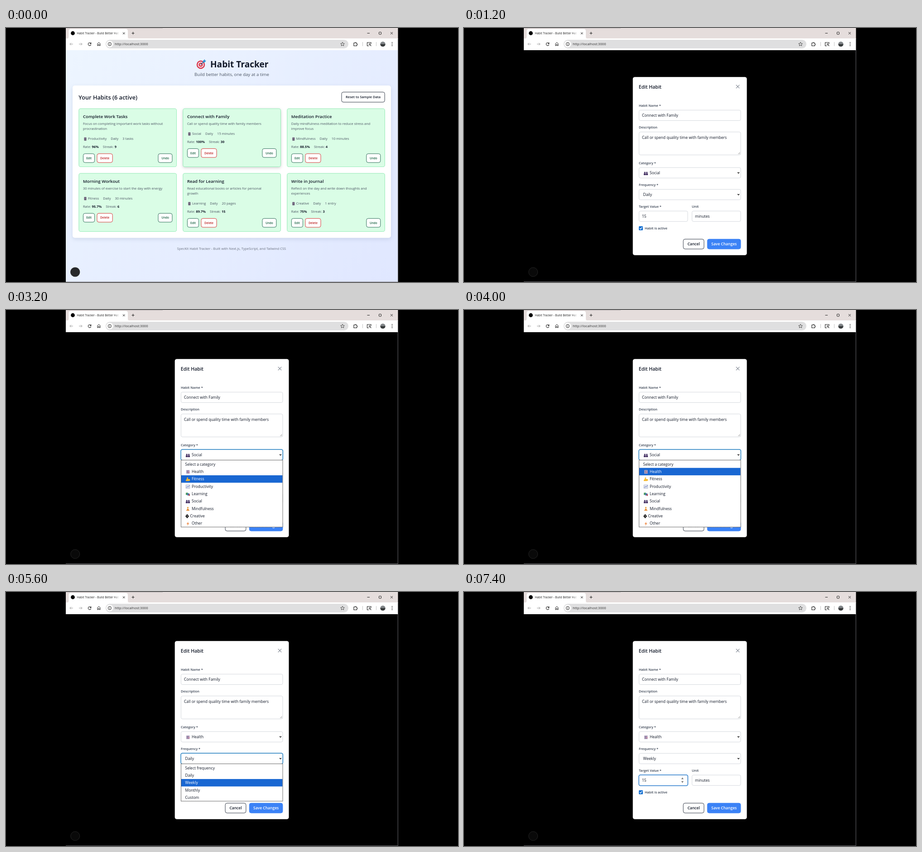
Write an HTML page that moves like this. It is 998 px wide and 561 px high and loops after 8000 ms.

```html
<!DOCTYPE html>
<html lang="en">
<head>
<meta charset="utf-8">
<title>Habit Tracker</title>
<style>
html, body { margin: 0; width: 100%; height: 100%; overflow: hidden; background: #000; }
svg { display: block; width: 998px; height: 561px; }
text { font-family: "Open Sans", "Noto Sans", sans-serif; white-space: pre; }
.panel { filter: drop-shadow(0 3px 4px rgba(40, 60, 110, .13)); }
.card { filter: drop-shadow(0 .6px .6px rgba(0, 0, 0, .1)); }
.card.lift { filter: drop-shadow(0 2px 3px rgba(0, 0, 0, .18)); }
</style>
</head>
<body>
<svg id="stage" viewBox="0 0 998 561" xmlns="http://www.w3.org/2000/svg"></svg>
<script>
const SMALL = 7.47, BASE = 8.53;
const INK = '#111827', GREY = '#4b5563', GREEN = '#14603f', FOCUS = '#2583c4';

// y is the middle of the line
const text = (x, y, s, size = BASE, weight = 400, fill = INK, anchor = 'start') =>
  `<text x="${x}" y="${(y + size * .35).toFixed(2)}" font-size="${size}" font-weight="${weight}" fill="${fill}" text-anchor="${anchor}">${s}</text>`;
const rect = (x, y, w, h, r, fill, stroke = 'none', sw = 1) =>
  `<rect x="${x}" y="${y}" width="${w}" height="${h}" rx="${r}" fill="${fill}" stroke="${stroke}" stroke-width="${sw}"/>`;
// the border lies inside the given edges
const box = (x, y, w, h, r, fill, stroke, sw = .9) =>
  rect(x + sw / 2, y + sw / 2, w - sw, h - sw, r - sw / 2, fill, stroke, sw);
const circle = (x, y, r, fill, stroke = 'none', sw = 1) =>
  `<circle cx="${x}" cy="${y}" r="${r}" fill="${fill}" stroke="${stroke}" stroke-width="${sw}"/>`;
const line = (d, stroke = '#333', sw = 1, fill = 'none') =>
  `<path d="${d}" stroke="${stroke}" stroke-width="${sw}" fill="${fill}"/>`;
const shape = (d, fill) => `<path d="${d}" fill="${fill}"/>`;
const group = (id, body) => `<g id="${id}">${body}</g>`;
const at = (x, y, body) => `<g transform="translate(${x} ${y})">${body}</g>`;
const button = (x, y, w, h, label, ink, edge, size, fill = '#fff') =>
  box(x, y, w, h, 4.5, fill, edge, 1) + text(x + w / 2, y + h / 2 + .2, label, size, 600, ink, 'middle');

function browser() {
  return rect(132, 0, 733.5, 24, 0, '#e5dddc') +
    line('M132 .3H346', '#a9a2a4', .8) +
    shape('M134 23.5Q138.500 23.500 138.500 19V7Q138.500 2 143.500 2H264Q269 2 269 7V19Q269 23.500 273 23.500Z', '#fff') +
    rect(132, 23, 733.5, 26, 0, '#fff') +
    circle(147.5, 11.5, 4.4, '#000') +
    `<g clip-path="url(#tabClip)">${text(156.5, 11.7, 'Habit Tracker - Build Better Habits', 6.4, 400, '#222')}</g>` +
    rect(239, 5, 11, 14, 0, 'url(#tabFade)') +
    line('M258 9.500l4.500 4.500m0-4.500l-4.500 4.500M277.500 11.500h6m-3-3v6', '#222') +
    line('M797.500 11.500h5.500M849 9l5 5m0-5l-5 5', '#222') +
    rect(823.5, 9, 5, 5, 1, 'none', '#222') +
    line('M148 35.500h-7m3-3l-3 3l3 3M161 35.500h7m-3-3l3 3l-3 3', '#a3a3a3') +
    line('M187.300 34A3.200 3.200 0 1 0 187.600 36.700M187.800 32v2.600h-2.600', '#222', 1.1) +
    line('M202 39V34.500L205 32L208 34.500V39H206V36.500H204V39Z', '#222') +
    rect(220, 26, 536, 19, 9.5, '#dfdfe0') +
    circle(229, 35.5, 7.3, '#fff') + circle(229, 35.5, 3.6, 'none', '#222') +
    line('M229 35v2.500M229 33.200v1', '#222', .9) +
    text(240, 35.6, 'http://localhost:3000', 7.6, 400, '#333') +
    line('M743 31.300l1.300 2.800 3 .3-2.300 2 .7 3-2.700-1.600-2.700 1.600.7-3-2.300-2 3-.3Z', '#333', .8) +
    line('M768 33H770.200A1.200 1.200 0 0 1 772.600 33H774.500V35A1.200 1.200 0 0 1 774.500 37.400V39.500H768Z', '#222', 1.2) +
    line('M787.500 31v9M817.500 31v9', '#c4c4c4') +
    line('M801 39.500H797.500V32H806V35', '#222', 1.1) +
    circle(803, 36, 1.6, 'none', '#222') + line('M804.200 37.300l2 2.500', '#222', 1.1) +
    circle(832, 35.5, 5.6, '#83878a') + shape('M826.400 35.500h11.200a5.600 5.600 0 0 1-11.200 0Z', '#383b3c') +
    [32, 35.5, 39].map(y => circle(852.5, y, .9, '#222')).join('');
}

function target() {
  return circle(430, 81, 9.2, '#d9344c') + circle(430, 81, 6.7, '#f2e9ee') +
    circle(430, 81, 4.6, '#d9344c') + circle(430, 81, 2.1, '#f2e9ee') +
    line('M430 81L438 73', '#1e5f86', 1.5) +
    shape('M434.500 76.500L435 72.500L439 69L439.500 71.700L442 72.300L438.700 76Z', '#3197d6');
}

function card(i, [title, desc, kind, goal, rate, streak]) {
  const x = 160.5 + 229.9 * (i % 3), y = 177.7 + 142.9 * (i > 2);
  const shift = desc.length > 1 ? 0 : -11.3;
  const meta = y + 67 + shift, stats = y + 84.8 + shift, by = y + 99.5 + shift;
  const b = s => `<tspan font-weight="700" fill="${INK}">${s}</tspan>`;
  const gap = s => `<tspan dx="9">${s}</tspan>`;
  return `<g class="card${i === 1 ? ' lift' : ''}">${box(x, y, 216.5, 129.3, 4.5, '#dafde6', '#8cecb1')}</g>` +
    text(x + 9.5, y + 17.8, title, 9.55, 600) +
    desc.map((s, n) => text(x + 9.5, y + 33.3 + n * 11.3, s, SMALL, 400, GREY)).join('') +
    rect(x + 12, meta - 3, 5, 7, .5, '#62566e') +
    line(`M${x + 13} ${meta - 1}h3m-3 2h3`, '#aaa0b6', .7) +
    text(x + 20.5, meta, kind + gap('Daily') + gap(goal), SMALL, 400, GREY) +
    text(x + 9.5, stats, `Rate: ${b(rate)}${gap('Streak: ')}${b(streak)}`, SMALL, 400, GREY) +
    button(x + 9.5, by, 26.2, 20.5, 'Edit', GREEN, '#32715c', 6.4) +
    button(x + 40, by, 35.2, 20.5, 'Delete', '#b91c1c', '#d63b3b', 6.4) +
    button(x + 175, by, 32, 20.5, 'Undo', GREEN, '#32715c', 6.4);
}

const habits = [
  ['Complete Work Tasks', ['Focus on completing important work tasks without', 'procrastination'], 'Productivity', '3 tasks', '96%', 9],
  ['Connect with Family', ['Call or spend quality time with family members'], 'Social', '15 minutes', '100%', 30],
  ['Meditation Practice', ['Daily mindfulness meditation to reduce stress and', 'improve focus'], 'Mindfulness', '10 minutes', '88.5%', 4],
  ['Morning Workout', ['30 minutes of exercise to start the day with energy'], 'Fitness', '30 minutes', '95.7%', 6],
  ['Read for Learning', ['Read educational books or articles for personal', 'growth'], 'Learning', '20 pages', '89.7%', 15],
  ['Write in Journal', ['Reflect on the day and write down thoughts and', 'experiences'], 'Creative', '1 entry', '75%', 3]
];

function page() {
  return rect(132, 49, 733.5, 512, 0, 'url(#sky)') + target() +
    text(451, 80, 'Habit Tracker', 19.1, 700) +
    text(498.5, 102.8, 'Build better habits, one day at a time', 9.6, 400, GREY, 'middle') +
    `<g class="panel">${rect(147, 127, 703, 336.5, 5, '#fff')}</g>` +
    text(160.3, 153.7, 'Your Habits (6 active)', 12.75, 600) +
    button(740.5, 141, 96.2, 23.3, 'Reset to Sample Data', INK, '#333b48', SMALL) +
    habits.map((h, i) => card(i, h)).join('') +
    text(498, 487.6, 'SpecKit Habit Tracker - Built with Next.js, TypeScript, and Tailwind CSS', SMALL, 400, '#6b7280', 'middle') +
    group('ring', box(398.2, 264, 29.6, 24, 6, 'none', '#17634a', 1.5)) +
    circle(152.7, 539, 10.6, '#27282b');
}

// small category pictures, centred on 0,0
const icons = {
  Health: rect(-3.5, -4, 7.5, 8, .5, '#b8a9c4') + line('M-2.500-2h5m-5 2h3m-3 2h5', '#786589', .9) + rect(1.5, 0, 2, 2, 0, '#d56d87'),
  Fitness: shape('M-4.500 4Q-5 1-2.500 0L-2-3.500Q0-5 1-3L-.500-1.500Q0 0 1.500-.500Q5-1 5 2.500Q3 4.500-4.500 4Z', '#f5b92f'),
  Productivity: rect(-4.5, -4, 9, 8, .5, '#dfe3ef', '#a5a9bd', .7) + line('M-3.500 2.500l2.500-3 1.500 1.500L4-3', '#5a70b5', 1),
  Learning: rect(-4.5, -3, 5, 5, .5, '#4c9b63') + rect(-1.5, -1.5, 5, 4.5, .5, '#4577ae') + rect(1.5, 0, 3, 4, .5, '#b45160'),
  Social: circle(-2.2, -1.7, 1.7, '#4b3869') + circle(2.2, -1.7, 1.7, '#4b3869') +
    shape('M-4.600 4V1Q-4.600 0-3.500 0H-.900Q-.200 0-.200 1V4ZM.200 4V1Q.200 0 1 0H3.500Q4.600 0 4.600 1V4Z', '#4b3869'),
  Mindfulness: circle(0, -2.7, 1.6, '#e8a33c') + shape('M0-1.500L2 1.500L4 4H-4L-2 1.500Z', '#e78b30'),
  Creative: at(-1.5, 0, shape('M0-4.800L4 0L0 4.800L-4 0Z', '#111') + text(0, .2, '?', 5.5, 700, '#fff', 'middle')),
  Other: shape('M1.500-4.500L-3 .700H-.300L-1.500 4.500L3-1H.300Z', '#ee8a45')
};
const withIcon = (name, y, fill = INK) =>
  at(401.5, y + .5, icons[name]) + text(name === 'Creative' ? 406.5 : 410, y, name, BASE, 400, fill);

const label = (x, y, s) => text(x, y, s, 7.4, 600, '#374151');
const field = (x, y, w, h = 24) => box(x, y, w, h, 3.7, '#fff', '#d1d5db');
const focusBox = (id, y, w = 225.4, color = FOCUS) => group(id, box(385.3, y, w + 1.4, 25.2, 4.2, 'none', color, 1.5));
const chevron = y => line(`M604 ${y - 1}l2 2 2-2`, '#111', 1.3);

function dropdown(id, top, names, plain) {
  const step = 16.35, h = names.length * step;
  const rows = names.map((s, i) => {
    const y = top + step * (i + .5) + .9;
    const row = fill => plain || i === 0 ? text(395.5, y, s, BASE, 400, fill) : withIcon(s, y, fill);
    return row(INK) + group(id + i, rect(387, y - 8.2, 223.5, 16.4, 0, '#1967d2') + row('#fff'));
  }).join('');
  return group(id, rect(386.5, top, 224.5, h + .7, 0, '#fff') + rows +
    rect(386.5, top, 224.5, h + .7, 0, 'none', '#6b6b6b'));
}

const categories = ['Select a category', ...Object.keys(icons)];
const frequencies = ['Select frequency', 'Daily', 'Weekly', 'Monthly', 'Custom'];

function modal() {
  return rect(132, 49, 733.5, 512, 0, '#000') +
    circle(152.7, 539, 10, '#090909', '#2b2b2b', .8) +
    rect(372.7, 108.3, 251.8, 393.5, 4.5, '#fff') +
    text(385.8, 130.3, 'Edit Habit', 10.6, 600) +
    line('M600.700 125.700l7.500 7.500m0-7.500l-7.500 7.500', '#7c838f', 1.1) +
    label(386, 171, 'Habit Name *') + field(386, 180.9, 225.4) + text(393, 193.4, 'Connect with Family') +
    label(386, 219.3, 'Description') + field(386, 229.2, 225.4, 51.6) +
    text(393, 241.8, 'Call or spend quality time with family members') +
    line('M605.500 278.500l4-4M608 278.500l1.500-1.500', '#777', .8) +
    label(386, 298, 'Category *') + field(386, 307.8, 225.4) + chevron(319.8) +
    group('social', withIcon('Social', 320.4)) + group('health', withIcon('Health', 320.4)) +
    label(386, 346, 'Frequency *') + field(386, 355.9, 225.4) + chevron(367.8) +
    group('daily', text(395.5, 368.2, 'Daily')) + group('weekly', text(395.5, 368.2, 'Weekly')) +
    label(386, 394, 'Target Value *') + field(386, 403.8, 108.4) + text(393, 416.2, '15') +
    label(503, 394, 'Unit') + field(503, 403.8, 108.4) + text(510, 416.2, 'minutes') +
    group('spin', shape('M479.700 413.500l2.600-4 2.600 4ZM479.700 417.800l2.600 4 2.600-4Z', '#7a7a7a')) +
    rect(386, 437.7, 9, 9, 1.5, '#1570d1') + line('M388 442.300l1.900 2 3.400-4.200', '#fff', 1.3) +
    label(399, 442.2, 'Habit is active') +
    button(483.6, 465.8, 46.8, 22.8, 'Cancel', INK, '#333b48', BASE) +
    button(536.8, 465.8, 74.6, 22.8, 'Save Changes', '#fff', '#3b82f6', BASE, '#3b82f6') +
    focusBox('focusCat', 307.2) + focusBox('focusFreq', 355.2) + focusBox('focusTarget', 403.2, 108.4, '#2f80d0') +
    dropdown('cat', 331.5, categories, false) +
    dropdown('freq', 379.5, frequencies, true);
}

document.getElementById('stage').innerHTML = `<defs>
  <linearGradient id="sky" gradientUnits="userSpaceOnUse" x1="190" y1="0" x2="810" y2="610">
    <stop offset="0" stop-color="#edf5ff"/><stop offset="1" stop-color="#e0e7ff"/></linearGradient>
  <linearGradient id="tabFade"><stop offset="0" stop-color="#fff" stop-opacity="0"/><stop offset="1" stop-color="#fff"/></linearGradient>
  <clipPath id="tabClip"><rect x="156" y="4" width="93.500" height="15"/></clipPath></defs>` +
  rect(0, 0, 998, 561, 0, '#000') + group('page', page()) + group('modal', modal()) + browser() +
  line('M132 560.500H865.300V24', '#85858a', .8);

// [from, to] in ms for every part that comes and goes
const LOOP = 8000;
const shown = {
  page: [0, 1200], ring: [600, 1200], modal: [1200, LOOP],
  social: [1200, 4200], health: [4200, LOOP],
  daily: [1200, 6200], weekly: [6200, LOOP],
  focusCat: [2400, 5000], focusFreq: [5000, 7200], focusTarget: [7200, LOOP],
  cat: [2400, 4200], freq: [5000, 6200], spin: [6200, LOOP]
};
// highlighted row of each list from a given time
const hover = { cat: [[2400, 5], [2800, 1], [3000, 2], [3600, 1]], freq: [[5000, 1], [5600, 2]] };
const lists = { cat: categories, freq: frequencies };
const show = (id, on) => document.getElementById(id).setAttribute('display', on ? 'inline' : 'none');

function draw(now) {
  const t = now % LOOP;
  for (const id in shown) show(id, t >= shown[id][0] && t < shown[id][1]);
  for (const id in hover) {
    const step = hover[id].filter(h => h[0] <= t).pop();
    lists[id].forEach((_, i) => show(id + i, step && step[1] === i));
  }
}
const start = performance.now();
function tick() {
  draw(performance.now() - start);
  requestAnimationFrame(tick);
}
tick();
</script>
</body>
</html>
```
